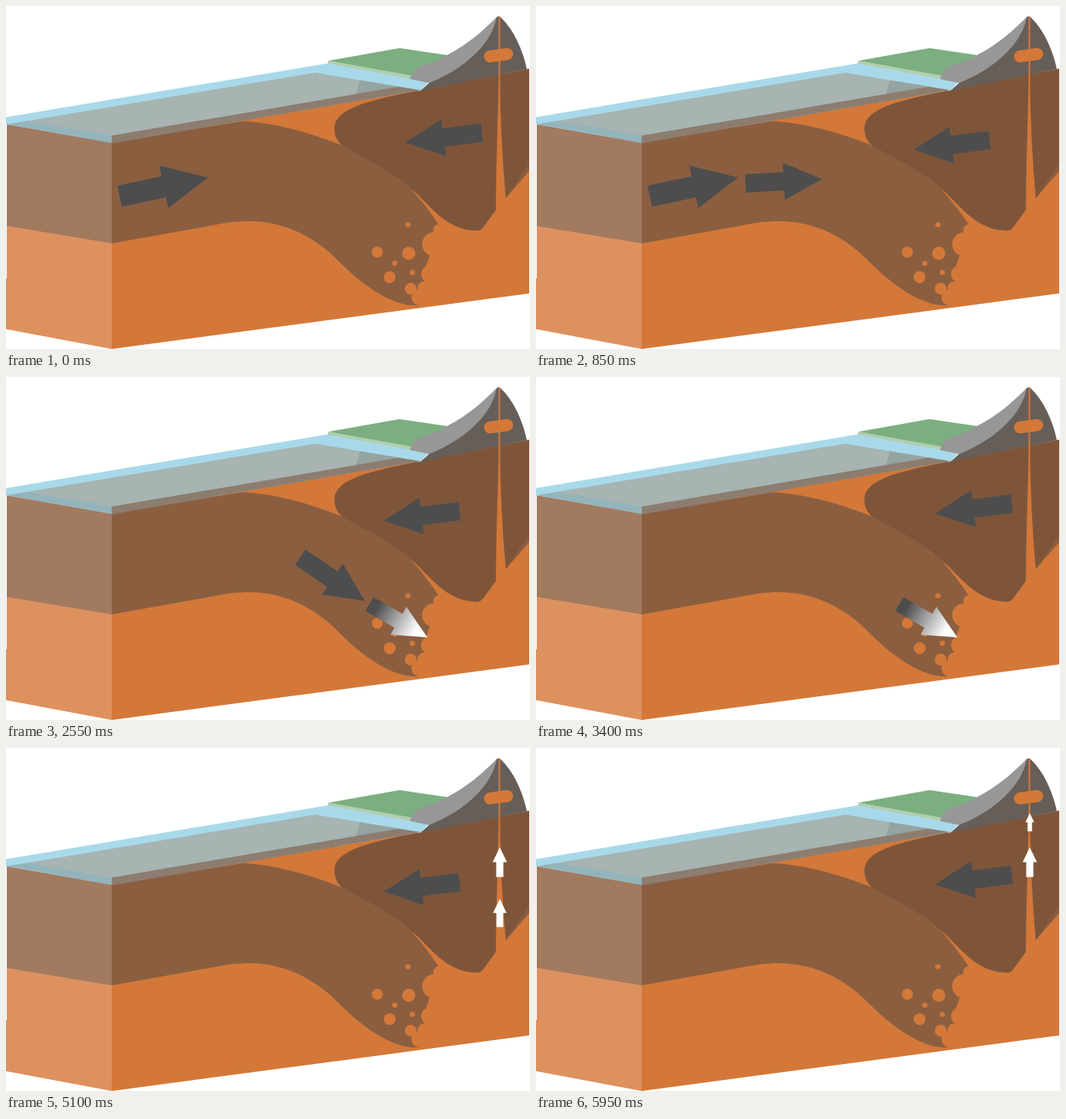
Write an HTML page that moves like this. It is 659x432 px and loops after 6.8 s.

```html
<!DOCTYPE html>
<html lang="en">
<head>
<meta charset="utf-8">
<title>Subduction zone</title>
<style>
  html, body { margin: 0; width: 100%; height: 100%; overflow: hidden; background: #fff; }
  svg { display: block; width: 659px; height: 432px; }
  .magma { fill: #d37839; }
  .slab { fill: #8b5e40; }
  .crust { fill: #7f553a; }
</style>
</head>
<body>
<svg viewBox="0 0 659 432">
  <defs>
    <linearGradient id="melt">
      <stop offset=".12" stop-color="#4d4d4d"/>
      <stop offset=".8" stop-color="#fff"/>
    </linearGradient>
  </defs>

  <!-- block -->
  <path class="magma" d="M133 172L521 106L658 79V362L133 432Z"/>
  <path fill="#dd915f" d="M1 276L133 298V432L0 407V343H1Z"/>
  <path fill="#a17a60" d="M1 149L133 172V299L1 277Z"/>

  <!-- sinking plate with a melting edge -->
  <path class="slab" d="M133 172L298 145C337 147 378 158 421 175C455 190 490 213 510 231Q528 251 544 275A7 7 0 0 0 538 285A15 15 0 0 0 533 314L528 328A11 11 0 0 0 527 347A8 8 0 0 0 518 357A10.100 10.100 0 0 0 520 377C490 380 452 355 421 324C388 289 345 268 295 271.500Q285 271 272 274L133 299Z"/>
  <g class="magma">
    <circle cx="467" cy="310" r="7"/>
    <circle cx="506.500" cy="311.500" r="8.300"/>
    <circle cx="489" cy="324" r="3.300"/>
    <circle cx="482.500" cy="341.500" r="7.500"/>
    <circle cx="505.500" cy="275.500" r="3.300"/>
    <circle cx="511" cy="335.500" r="3.300"/>
    <circle cx="509" cy="356" r="7.500"/>
  </g>

  <!-- upper plate -->
  <path class="crust" d="M658 79L521 106C460 118 413 128 413 154C413 164 417 171 423 176L450 191C478 205 498 220 510 231C527 242 550 283 592 283Q597 283 600 279L616 257L616.500 215Q618 150 620 87H621Q622 170 628.500 242L658 205Z"/>
  <path class="slab" d="M628.500 242L658 199V208Z"/>

  <!-- sea -->
  <path fill="#a8d9ea" d="M0 140L406 72L532 95L521 107L494 102L133 163L0 149Z"/>
  <path fill="#a7b4b1" d="M1 149L389 84L494 101.500L133 163Z"/>
  <path fill="#95a3a1" d="M445 93.500L494 101.500L440 111Z"/>
  <path fill="#8c7d70" d="M133 163L494 101.500L521 106L133 173Z"/>
  <path fill="#94b4bb" d="M1 149L27 144.700L133 163V172.500Z"/>

  <!-- land and volcano -->
  <path fill="#7caf80" d="M405 69L495 53L556 62L513 89Z"/>
  <path fill="#b1ceae" d="M405 69L513 88L510 92L405 72.500Z"/>
  <path fill="#979797" d="M508 92Q512 78 526 74Q545 69 556 61C580 49 600 31 617 14V40L580 85L532 97Z"/>
  <path fill="#665e58" d="M617 14Q619.500 12 622 14C639 30 650 56 655 79.500L521 107L532 97C580 78 612 45 617 14Z"/>
  <path class="magma" d="M619.500 14H621.500V87L621 125H620L619.500 87Z"/>
  <rect class="magma" x="601" y="54.500" width="37" height="15" rx="7.500" transform="rotate(-8 619.500 62)"/>

  <g id="arrows"></g>
</svg>
<script>
const STEP = 850, STEPS = 8;
const DARK = '#4d4d4d';
const layer = document.getElementById('arrows');

// One arrow shape of length 1, placed from tail to tip
function place(el, x, y, tipX, tipY) {
  const dx = tipX - x, dy = tipY - y;
  const angle = Math.atan2(dy, dx) * 180 / Math.PI;
  el.setAttribute('transform',
    `translate(${x} ${y}) rotate(${angle}) scale(${Math.hypot(dx, dy)})`);
}

function arrow(fill, ...ends) {
  const el = document.createElementNS(layer.namespaceURI, 'path');
  el.setAttribute('d', 'M0-.12H.5V-.24L1 0L.5.24V.12H0Z');
  el.setAttribute('fill', fill);
  place(el, ...ends);
  return layer.appendChild(el);
}

const rise = (x, tail, tip) => arrow('#fff', x, tail, x, tip);

const back = arrow(DARK, 598.5, 159.5, 502, 172);
const sink = [
  arrow(DARK, 143, 239.5, 254, 216),
  arrow(DARK, 263.5, 223.5, 360, 218),
  arrow(DARK, 370, 227, 451, 282),
  arrow('url(#melt)', 457, 286, 530, 328)
];
const climb = [
  rise(624.3, 303, 252),
  rise(621, 225.5, 190),
  rise(621, 162.5, 125),
  rise(621, 105, 82)
];
const chain = [...sink, ...climb];
const climbStart = sink.length + 1;

const start = performance.now();

function draw(now) {
  const step = Math.floor(Math.max(0, now - start) / STEP) % STEPS;
  const sinking = step < climbStart;
  // Each arrow shows together with the one before it, within its own phase
  chain.forEach((el, n) => {
    const near = n === step || n === step - 1;
    const inPhase = (n < sink.length) === sinking;
    el.style.display = near && inPhase ? '' : 'none';
  });
  const pushed = (sinking ? step : step - climbStart) % 2;
  place(back, 598.5 - 28 * pushed, 159.5 + 9.5 * pushed, 502 - 27 * pushed, 172 + 9 * pushed);
  requestAnimationFrame(draw);
}
draw(start);
</script>
</body>
</html>
```
